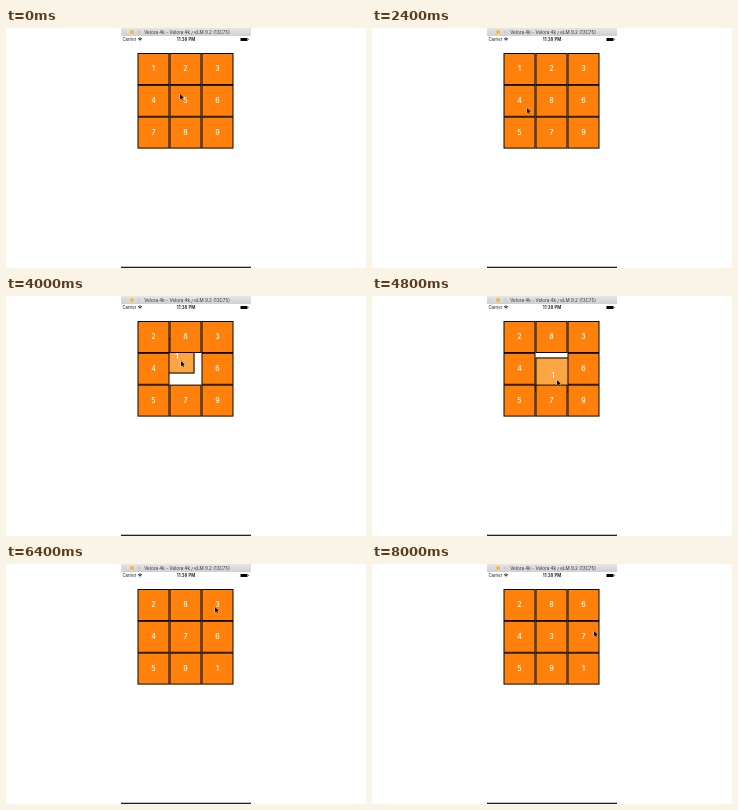
An HTML page with a canvas that plays this animation: 360 px wide and 240 px high, repeating every 8400 ms.

```html
<!DOCTYPE html>
<html lang="en">
<head>
<meta charset="utf-8">
<title>Reorder grid</title>
<style>
  html, body { margin: 0; width: 100%; height: 100%; overflow: hidden; background: #fff; }
  canvas { display: block; width: 360px; height: 240px; }
</style>
</head>
<body>
<canvas id="stage" width="360" height="240"></canvas>
<script>
const ctx = document.getElementById('stage').getContext('2d');
const STEP = 400;
const CELL = 32, LIFT = 1.1;
const ORANGE = '#ff800a', LIGHT = '#fba643';

// Where the pointer grips each dragged tile, relative to its centre
const grip = { 5: [-5.5, -7], 1: [4, 5], 3: [-2, 2] };

// Tile order, pointer x, pointer y, held tile (0 = none)
const steps = [
  ['123456789', 174, 66, 0],
  ['123456789', 174, 66, 5],
  ['123456789', 169, 72, 5],
  ['123456789', 162, 80, 5],
  ['123486759', 154, 90, 5],
  ['123486579', 143, 99, 5],
  ['123486579', 155, 80, 0],
  ['123486579', 151, 46, 0],
  ['123486579', 151, 46, 1],
  ['213486579', 166, 51, 1],
  ['283416579', 175, 65, 1],
  ['283416579', 179, 71, 1],
  ['283416579', 185, 84, 1],
  ['283476591', 207, 105, 1],
  ['283476591', 214, 110, 1],
  ['283476591', 217, 110, 1],
  ['283476591', 209, 43, 0],
  ['283476591', 209, 43, 3],
  ['286437591', 186, 70, 3],
  ['286437591', 177, 75, 3],
  ['286437591', 222, 67, 0]
];

function text(str, x, y, font, color, align = 'center') {
  ctx.font = font + ' Inter, sans-serif';
  ctx.fillStyle = color;
  ctx.textAlign = align;
  ctx.textBaseline = 'middle';
  ctx.fillText(str, x, y);
}

function dot(x, y, r, color) {
  ctx.fillStyle = color;
  ctx.beginPath();
  ctx.arc(x, y, r, 0, Math.PI * 2);
  ctx.fill();
}

function drawWindow() {
  const bar = ctx.createLinearGradient(0, 0, 0, 8);
  bar.addColorStop(0, '#e6e6e6');
  bar.addColorStop(1, '#d0d0d0');
  ctx.fillStyle = bar;
  ctx.fillRect(115, 0, 130, 8);
  dot(118.5, 4, 1.9, '#dcd3d2');
  dot(126, 4, 2, '#f9b62f');
  dot(133, 4, 1.9, '#cfcfcf');
  text('Velora 4k - Velora 4k / eLM 9.2 (13C75)', 181, 4.2, '4.6px', '#333');

  text('Carrier', 116.5, 11.5, '4.2px', '#111', 'left');
  text('11:38 PM', 180, 11.5, '600 4.3px', '#111');
  drawWifi(134, 13);

  ctx.fillStyle = '#000';
  ctx.fillRect(234.5, 10, 7, 3);
  ctx.fillRect(242, 11, 0.6, 1);
  ctx.fillStyle = '#222';
  ctx.fillRect(115, 238.7, 130, 1.3);
}

function drawWifi(x, y) {
  ctx.strokeStyle = '#111';
  ctx.lineWidth = 0.8;
  for (const r of [0.5, 1.7, 2.9]) {
    ctx.beginPath();
    ctx.arc(x, y, r, -Math.PI * 0.76, -Math.PI * 0.24);
    ctx.stroke();
  }
}

function drawTile(label, x, y, held) {
  const scale = held ? LIFT : 1;
  ctx.save();
  ctx.translate(x, y);
  ctx.scale(scale, scale);
  ctx.fillStyle = '#0a0500';
  ctx.fillRect(-CELL / 2, -CELL / 2, CELL, CELL);
  const inner = CELL - 2;
  ctx.fillStyle = held ? LIGHT : ORANGE;
  ctx.fillRect(-inner / 2, -inner / 2, inner, inner);
  text(label, 0, 0.3, '500 7.2px', '#fff');
  ctx.restore();
}

function drawPointer(x, y) {
  const pts = [[0, 0], [0, 5.2], [1.2, 4.2], [2.1, 6.2], [3, 5.8], [2.2, 3.9], [3.8, 3.8]];
  ctx.beginPath();
  for (const [dx, dy] of pts) ctx.lineTo(x + dx, y + dy);
  ctx.closePath();
  ctx.strokeStyle = 'rgba(255,255,255,0.7)';
  ctx.lineWidth = 0.8;
  ctx.stroke();
  ctx.fillStyle = '#000';
  ctx.fill();
}

function draw(now) {
  const [order, px, py, held] = steps[Math.floor(now / STEP) % steps.length];
  ctx.fillStyle = '#fff';
  ctx.fillRect(0, 0, 360, 240);
  drawWindow();
  // Tiles stack by number, so higher ones cover the dragged tile
  for (let n = 1; n <= 9; n++) {
    const slot = order.indexOf(n);
    let x = 147.5 + CELL * (slot % 3);
    let y = 41 + 31.8 * Math.floor(slot / 3);
    if (n === held) {
      x = px - grip[n][0];
      y = py - grip[n][1];
    }
    drawTile(String(n), x, y, n === held);
  }
  drawPointer(px, py);
}

const start = performance.now();
function tick() {
  draw(performance.now() - start);
  requestAnimationFrame(tick);
}
tick();
</script>
</body>
</html>
```
